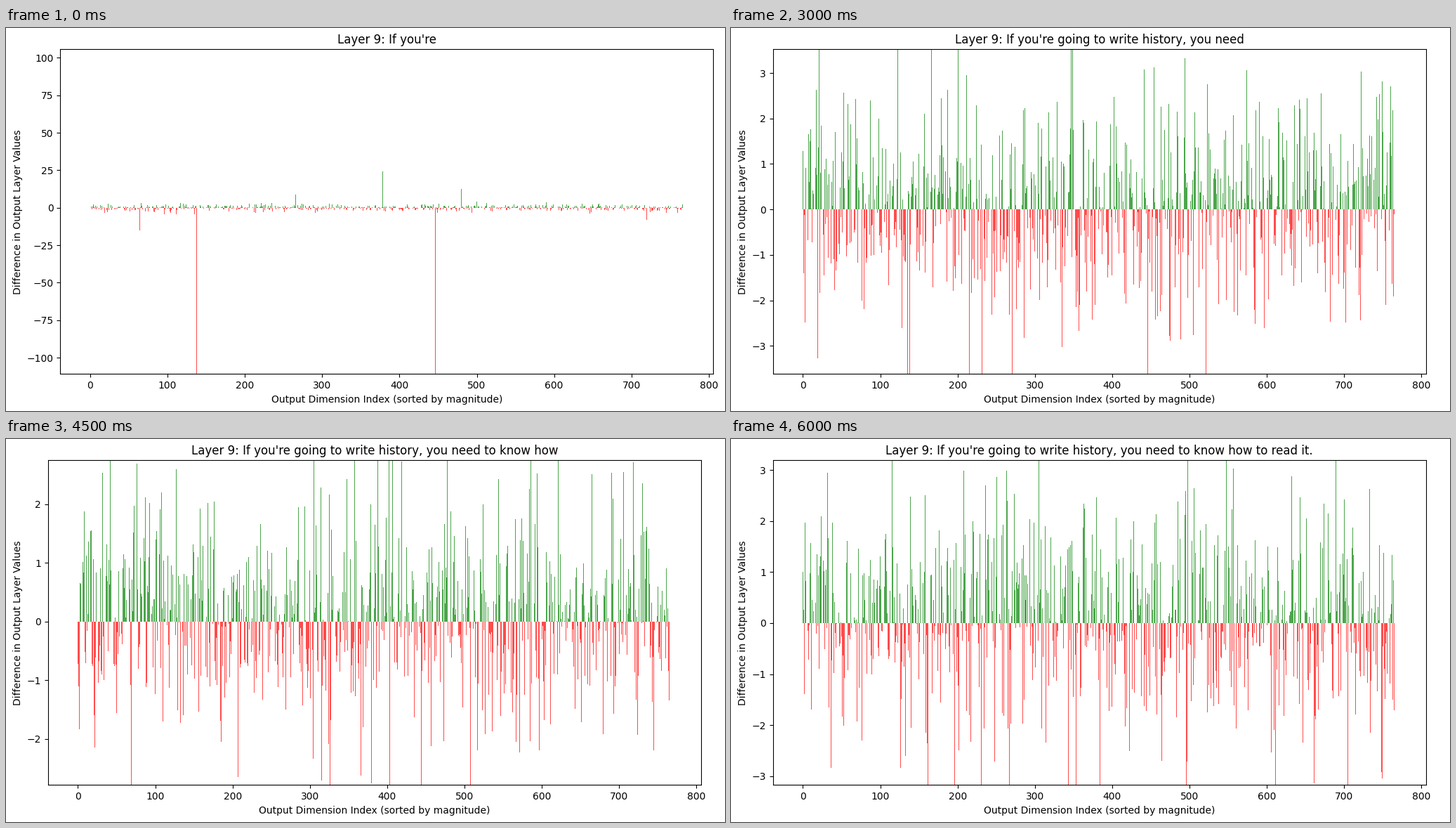
A matplotlib script for the animation above (6500 ms loop, 1024 by 545 pixels).

```python
import numpy as np
import matplotlib.pyplot as plt
from matplotlib.animation import FuncAnimation

W, H, DPI = 1024, 545, 100
AX_W, AX_H = 930, 462
PAD_X = 9.98
PAD_Y = 9.39   # text rounds to the lower pixel row, lines still snap in place
LIFT = 10 - PAD_Y
DIMS = 768
STEP_MS = 500

WORDS = "If you're going to write history, you need to know how to read it.".split()
FRAMES = len(WORDS) - 1

# Axis range at every second step, filled in geometrically between.
KEYS = np.arange(0, FRAMES, 2)
UP_KEYS = [105.9, 26.17, 7.42, 3.53, 2.915, 2.602, 3.2]
DOWN_KEYS = [110.6, 27.33, 7.75, 3.61, 2.933, 2.636, 3.165]

# A few dimensions stand out at first and fade with each word.
GIANTS = [138, 446]
PEAKS = {64: -14, 266: 9.8, 378: 23, 480: 12, 720: -9}
GREY_STEPS = (1, 2, 3)


def between(i, keys):
    return float(np.exp(np.interp(i, KEYS, np.log(keys))))


def step_values(i, top):
    rng = np.random.default_rng(900 + i)
    vals = min(1.15, top / 2.7) * rng.standard_t(9, DIMS)
    for dim, size in PEAKS.items():
        vals[dim] += size * 0.5 ** i
    vals[GIANTS] -= 3000 * 0.35 ** i
    return vals


fig = plt.figure(figsize=(W / DPI, H / DPI), dpi=DPI)
ax = fig.add_axes([0.07, 0.1, AX_W / W, AX_H / H])
bars = ax.bar(np.arange(DIMS), np.ones(DIMS), width=0.8, alpha=0.7)
ax.set_xlabel("Output Dimension Index (sorted by magnitude)")
ax.set_ylabel("Difference in Output Layer Values")
margin = 0.05 * (DIMS - 0.2)
ax.set_xlim(-0.4 - margin, DIMS - 0.6 + margin)


def fit_axes():
    """Shift the axes so the labels keep a fixed padding to the stage edge."""
    ren = fig.canvas.get_renderer()
    box = ax.get_window_extent(ren)
    x = box.x0 + PAD_X - ax.yaxis.get_tightbbox(ren).x0
    y = box.y0 + PAD_Y - ax.xaxis.get_tightbbox(ren).y0
    ax.set_position([x / W, y / H, AX_W / W, AX_H / H])


def update(i):
    top, bottom = between(i, UP_KEYS), between(i, DOWN_KEYS)
    for bar, v in zip(bars, step_values(i, top)):
        bar.set_height(v)
        bar.set_facecolor("green" if v > 0 else "red")
    if i in GREY_STEPS:
        for dim in GIANTS:
            bars[dim].set_facecolor("#404040")
    lift = LIFT / AX_H * (top + bottom)
    ax.set_ylim(-bottom - lift, top - lift)
    ax.set_title("Layer 9: " + " ".join(WORDS[:i + 2]))
    fit_axes()
    return []


anim = FuncAnimation(fig, update, frames=FRAMES, init_func=lambda: [],
                     interval=STEP_MS, repeat=True, repeat_delay=0, blit=False)
plt.show()
```
